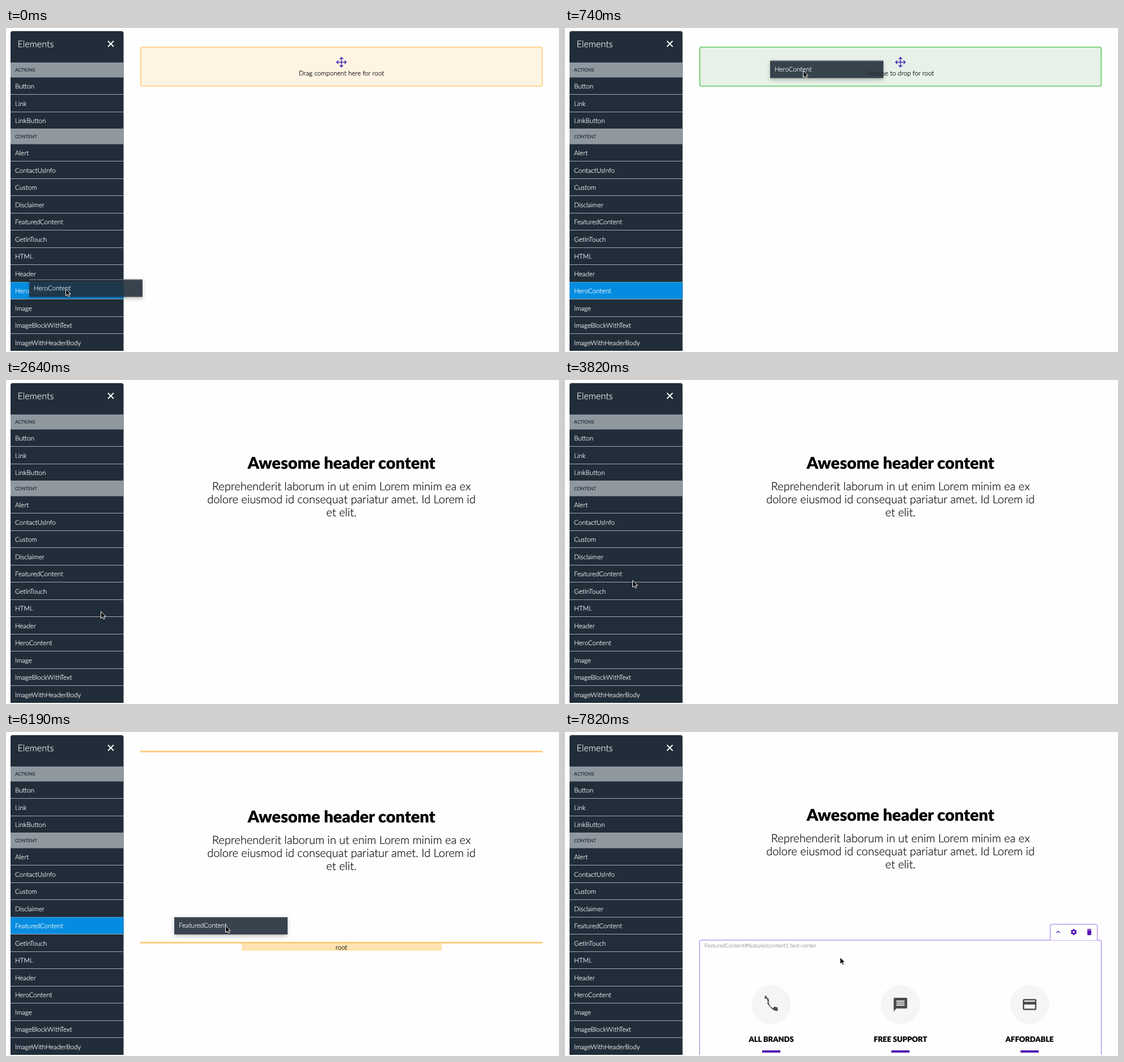
Write an HTML page that moves like this. It is 976 px wide and 573 px high and loops after 8000 ms.

```html
<!DOCTYPE html>
<html lang="en">
<head>
<meta charset="utf-8">
<title>Page builder</title>
<style>
html, body { margin: 0; width: 100%; height: 100%; overflow: hidden; background: #fefefe; }
svg { position: absolute; left: 0; top: 0; }
text, #ghost { font-family: Lato, sans-serif; font-weight: 300; text-rendering: geometricPrecision; }
text, #ghost { -webkit-text-stroke: .2px; }
#ghost {
  position: absolute; left: 0; top: 0; box-sizing: border-box; width: 199.5px; height: 30.5px; padding-left: 8px;
  border-top: 1px solid #929aa1; background: #212d39; color: #fff; opacity: .89;
  font-size: 11.6px; line-height: 29px;
  box-shadow: 0 3px 4px -2px rgba(0,0,0,.2), 0 4px 7px 1px rgba(0,0,0,.1), 0 1px 9px 2px rgba(0,0,0,.08);
}
</style>
</head>
<body>
<svg id="stage" width="976" height="571"></svg>
<div id="ghost"></div>
<svg id="pointer" width="976" height="573"></svg>
<script>
const LOOP = 8000, STEP = 147.4;
const PURPLE = '#5012b5', OUTLINE = '#9b6fe0';
const ITEM = 11.6, ROW = 30.5;
const $ = id => document.getElementById(id);

const rect = (x, y, w, h, fill, extra = '') =>
  `<rect x="${x}" y="${y}" width="${w}" height="${h}" fill="${fill}" ${extra}/>`;
const frame = (x, y, w, h, stroke, fill, width) =>
  rect(x, y, w, h, fill, `rx="3" stroke="${stroke}" stroke-width="${width}"`);
// y is the middle of the capitals
const label = (x, y, str, size, fill, weight = 300, anchor = 'start') =>
  `<text x="${x}" y="${y + size * .36}" font-size="${size}" fill="${fill}" stroke="${fill}" stroke-width=".2" style="font-weight:${weight}" text-anchor="${anchor}">${str}</text>`;
const centered = (y, str, size, weight, x = 592) => label(x, y, str, size, '#000', weight, 'middle');
const spin = (count, shape) => Array.from({ length: count }, (_, i) =>
  `<g transform="rotate(${360 / count * i})">${shape}</g>`).join('');

// Icons are centred on 0,0
const ICONS = {
  gear: '<circle r="2.9" fill="none" stroke="currentColor" stroke-width="2.4"/>' +
    spin(6, rect(-1.4, -5.4, 2.8, 2.4, 'currentColor')),
  trash: rect(-4, -5.2, 8, 1.2, 'currentColor') + rect(-1.5, -5.8, 3, 1, 'currentColor') +
    rect(-3.5, -3.3, 7, 8.7, 'currentColor', 'rx="1"'),
  up: '<path d="M-3 1.500L0-1.500L3 1.500" fill="none" stroke="currentColor" stroke-width="1.300"/>',
  phone: '<path d="M-10-11h4.500l1.300 5.500-2.700 2.700Q-4 3 2.800 6.900L5.500 4.200l5.500 1.300V11Q-1 11-6-6T-11-10z" fill="currentColor" stroke="currentColor" stroke-linejoin="round"/>',
  chat: '<path d="M-12 12V-10q0-2 2-2H10q2 0 2 2V5q0 2-2 2H-7z" fill="currentColor"/>' +
    [-7, -3.5, 0].map(y => rect(-7.2, y, 14.4, 2, '#f5f5f7')).join(''),
  card: rect(-10.800, -8.500, 21.600, 17, 'none', 'rx="1.500" stroke="currentColor" stroke-width="2.400"') +
    rect(-11, -5, 22, 5, 'currentColor'),
  move: spin(4, '<path d="M0 0V-8.500M-3-5.500L0-8.500L3-5.500" fill="none" stroke="currentColor" stroke-width="1.500"/>')
};
const icon = (name, x, y, color) =>
  `<g transform="translate(${x} ${y})" color="${color}">${ICONS[name]}</g>`;

function sidebar(active) {
  const groups = {
    ACTIONS: ['Button', 'Link', 'LinkButton'],
    CONTENT: ['Alert', 'ContactUsInfo', 'Custom', 'Disclaimer', 'FeaturedContent', 'GetInTouch', 'HTML',
      'Header', 'HeroContent', 'Image', 'ImageBlockWithText', 'ImageWithHeaderBody']
  };
  let out = rect(8, 5.5, 199.5, 580, '#212d39', 'rx="4"') + label(20.5, 28, 'Elements', 16.2, '#fff') +
    '<path d="M180 23l10 10m0-10l-10 10" stroke="#fff" stroke-width="1.8"/>';
  let y = 61;
  for (const [title, items] of Object.entries(groups)) {
    out += rect(8, y, 199.5, 26.5, '#8f989f') + label(16, y + 13.2, title, 8.2, '#212d39', 400);
    y += 26.5;
    for (const name of items) {
      if (name === active) out += rect(8, y, 199.5, ROW, '#048de0');
      out += label(16, y + 15.5, name, ITEM, '#fff') + rect(8, Math.floor(y + 30), 199.5, 1, '#a3aab0');
      y += ROW;
    }
  }
  return out;
}

function dropZone(over) {
  const [border, fill, text] = over ? ['#5fca62', '#e7f1e8', 'Release to drop']
                                    : ['#ffca76', '#fff4e3', 'Drag component here'];
  return frame(237.8, 33.8, 708.6, 69, border, fill, 1.6) + icon('move', 592, 60.5, '#3f2bb0') +
    centered(79.5, text + ' for root', ITEM, 300);
}

const hero = shift => centered(147 + shift, 'Awesome header content', 28.8, 900) +
  ['Reprehenderit laborum in ut enim Lorem minim ea ex',
   'dolore eiusmod id consequat pariatur amet. Id Lorem id', 'et elit.']
    .map((line, i) => centered(188 + shift + 23 * i, line, 20, 300)).join('');

function selection(y, height, name, buttons) {
  const left = 939.5 - 27.7 * buttons.length;
  return frame(237.5, y, 709, height, OUTLINE, 'none', 1) + label(246, y + 10, name, 9.7, '#999') +
    `<path d="M${left} ${y}v-25q0-3 3-3H936.5q3 0 3 3v25" fill="#fefefe" stroke="${OUTLINE}"/>` +
    buttons.map((name, i) => icon(name, 925.3 - 27.4 * (buttons.length - 1 - i), y - 14.2, PURPLE)).join('');
}

const dropLines = over => rect(237, 33, 710, 3, '#ffce80') +
  rect(237, 371, 710, 3, over ? '#78c6fa' : '#ffce80') +
  rect(416, 374, 353, 13, over ? '#aedefd' : '#ffe2b2') + centered(380.5, 'root', ITEM, 300);

const features = () => [['phone', 'ALL BRANDS'], ['chat', 'FREE SUPPORT'], ['card', 'AFFORDABLE']]
  .map(([name, title], i) => {
    const x = 364 + 228 * i;
    return `<circle cx="${x}" cy="482" r="34.5" fill="#f5f5f7"/>` + icon(name, x, 482, '#4d4d4f') +
      centered(543, title, 13, 900, x) + rect(x - 16, 563, 32, 4, PURPLE);
  }).join('');

// Stops of a movement: [arrive, leave, x, y], times in steps
const CURSOR = [[0, 0, 105, 461], [5, 7, 420, 75], [12, 14, 889, 23], [18, 20, 167, 409], [24, 24, 66, 430],
  [26, 26, 119, 354], [28, 30, 115, 376], [38, 40, 73, 342], [42, 42, 387, 342], [46, 49, 431, 382], [53, 53, 485, 398]];
const GHOST = [[0, 0, 41, 444.5], [5, 40, 362, 57.5], [40, 40, 8, 327], [42, 42, 297, 327], [46, 53, 365, 368.5]];

function at(stops, step) {
  const next = stops.findIndex(([, leave]) => step <= leave);
  const [arrive, , x, y] = stops[next];
  if (step >= arrive) return [x, y];
  const [, left, fromX, fromY] = stops[next - 1];
  const p = (step - left) / (arrive - left), eased = p * p * (3 - 2 * p);
  return [fromX + (x - fromX) * eased, fromY + (y - fromY) * eased];
}

function scene(step) {
  const placingHero = step < 7, placingFeatures = step >= 41 && step < 49;
  const dragged = placingHero ? 'HeroContent' : placingFeatures ? 'FeaturedContent' : '';
  let out = sidebar(dragged);
  if (placingHero) out += dropZone(step >= 4);
  else out += hero(placingFeatures ? 3 : 0);
  if (step >= 9 && step < 17) out += selection(33.5, 325.5, 'HeroContent#herocontent1', ['gear', 'trash']);
  if (placingFeatures) out += dropLines(step >= 45);
  if (step >= 49) out += features();
  if (step >= 52) out += selection(368, 300, 'FeaturedContent#featuredcontent1.text-center', ['up', 'gear', 'trash']);
  $('stage').innerHTML = out;

  const ghost = $('ghost');
  const [gx, gy] = at(GHOST, step);
  ghost.style.display = dragged ? 'block' : 'none';
  ghost.style.transform = `translate(${gx}px, ${gy}px)`;
  ghost.textContent = dragged;

  const [x, y] = at(CURSOR, step);
  const hand = step >= 12 && step < 15;
  $('pointer').innerHTML = `<g transform="translate(${x} ${y})" stroke-linejoin="round">` + (hand
    ? '<path d="M1 1Q2.5-.5 3.5 1.500L5 5.500 8 6 9.500 7V10L8 13.500H3L-2 8.500 2.500 9z" fill="#fff" stroke="#000"/>'
    : '<path d="M.5.5V12.500L3.300 10 5.400 14 7.400 13 5.500 9.200H9.200z" fill="#000" stroke="#fff"/>') + '</g>';
}

let shown = -1;
function tick() {
  const step = Math.min(53, Math.floor(performance.now() % LOOP / STEP + .11));
  if (step !== shown) scene(shown = step);
  requestAnimationFrame(tick);
}
tick();
</script>
</body>
</html>
```
